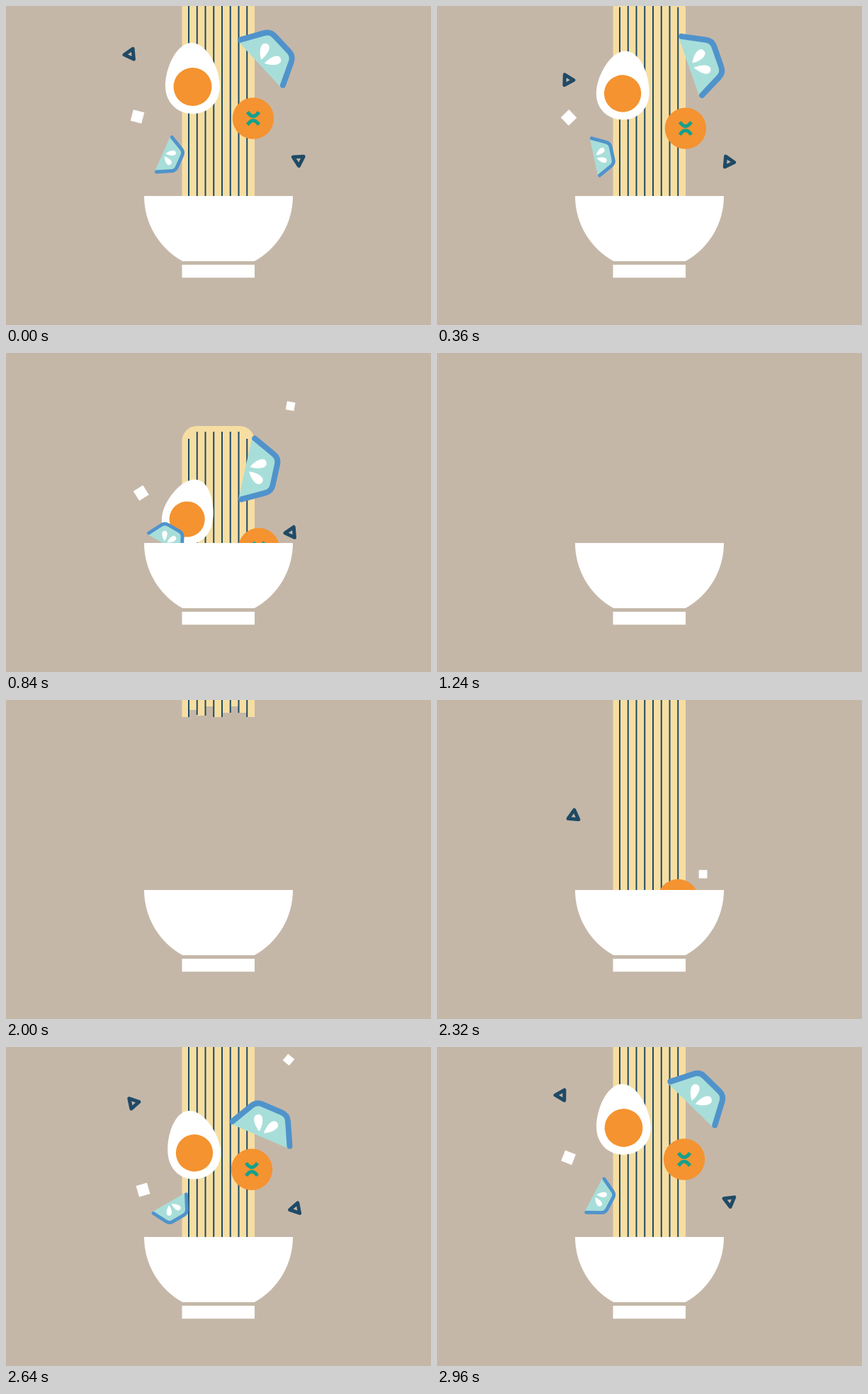
Write an HTML page with a canvas that moves like this. It is 600 px wide and 450 px high and loops after 3000 ms.

```html
<!DOCTYPE html>
<html lang="en">
<head>
<meta charset="utf-8">
<title>Noodle bowl</title>
<style>
  html, body { margin: 0; height: 100%; overflow: hidden; background: #c5b7a8; }
  canvas { display: block; }
</style>
</head>
<body>
<canvas id="stage" width="600" height="450"></canvas>
<script>
const ctx = document.getElementById('stage').getContext('2d');
const LOOP = 3000, STEP = 40, RIM = 268;
const NAVY = '#1f4a66', NOODLE = '#f6dea2', ORANGE = '#f49330', TEAL = '#16a08c';

function fill(color, d) {
  ctx.fillStyle = color;
  ctx.fill(new Path2D(d));
}

function stroke(color, width, d, cap = 'round') {
  ctx.strokeStyle = color;
  ctx.lineWidth = width;
  ctx.lineCap = cap;
  ctx.lineJoin = 'round';
  ctx.stroke(new Path2D(d));
}

function disc(r) {
  ctx.fillStyle = ORANGE;
  ctx.beginPath();
  ctx.arc(0, 0, r, 0, 7);
  ctx.fill();
}

function egg() {
  fill('#fff', 'M0-62C22-62 38.5-25 38.5-1C38.5 23 21 38 0 38S-38.5 23-38.5-1C-38.5-25-22-62 0-62');
  disc(27);
}

function carrot() {
  disc(29.2);
  stroke(TEAL, 5, 'M-8-9Q0 3 8-9M-8 9Q0-3 8 9', 'butt');
}

function cucumber() {
  const rind = 'L35-28Q43-24 43-15V15Q43 24 35 28L';
  fill('#a8ded9', 'M0-44' + rind + '0 44Z');
  stroke('#5093cb', 8, 'M4-44' + rind + '4 44');
  for (const turn of [-0.5, 1]) {
    ctx.rotate(turn);
    fill('#fff', 'M7 0C17-7 31-9 31 0S17 7 7 0');
  }
}

const triangle = () => stroke(NAVY, 5, 'M0-8.5L7.4 4.25H-7.4Z');

const square = side => () => {
  ctx.fillStyle = '#fff';
  ctx.fillRect(-side / 2, -side / 2, side, side);
};

// peak: position at the top of the jump; rise: 360 ms before it; fall: 640 ms after it.
// spin is in degrees per second, shrink is scale lost per second away from the peak.
const items = [
  { draw: egg, peak: [263.5, 114], rise: [266, 149.5], fall: [259, 167.3], power: 3, angle: -2, spin: 21, shrink: 0.085 },
  { draw: cucumber, peak: [358, 82.5], rise: [358.5, 126], fall: [348, 111], power: 3.8, angle: -43, spin: 66 },
  { draw: carrot, peak: [349, 158.5], rise: [347, 172.7], fall: [354, 218], power: 2.5, angle: 0, spin: 0 },
  { draw: cucumber, peak: [221, 208.5], rise: [230, 219], fall: [222.5, 235.5], power: 3, angle: 24, spin: -100, size: 0.61 },
  { draw: triangle, peak: [175.5, 68], rise: [179.5, 79], fall: [199, 221], power: 2.5, angle: 25, spin: -148 },
  { draw: triangle, peak: [413, 217], rise: [409, 228], fall: [407, 233], power: 3, angle: 57, spin: 105 },
  { draw: square(16), peak: [185.5, 156], rise: [193.5, 201.5], fall: [188, 170], power: 4, angle: 15, spin: -163 },
  { draw: square(11.8), peak: [406, -11.6], rise: [399, 18], fall: [404, 16], power: 4.2, angle: 85, spin: 125 }
];

// t is the signed time from the peak, in ms
function drawItem(item, t) {
  const { draw, peak, rise, fall, power, angle, spin, shrink = 0, size = 1 } = item;
  const rising = t < 0;
  const k = rising ? (-t / 360) ** 3.4 : (t / 640) ** power;
  const pose = rising ? rise : fall;
  const x = peak[0] + (pose[0] - peak[0]) * k ** 0.68;
  const y = peak[1] + (pose[1] - peak[1]) * k;
  const scale = size - shrink * Math.abs(t) / 1000;
  ctx.save();
  ctx.translate(x, y);
  ctx.rotate((angle + spin * t / 1000) * Math.PI / 180);
  ctx.scale(scale, scale);
  draw();
  ctx.restore();
}

const LEFT = 248.5, RIGHT = 351;
const lineX = i => 258 + 11.75 * i;
const strandLag = [0, 10, 2, 15, 0, 6, 15, 6, 0];
const lineLag = [0, 3, 2, 0, 0, 6, 6, 0];

function drawNoodles(t) {
  if (t < 0) {
    const head = t + 1024;
    const strand = (color, x, width, lag) => {
      ctx.fillStyle = color;
      ctx.fillRect(x, -10, width, Math.max(0, Math.min(300, head - lag) + 10));
    };
    strandLag.forEach((lag, i) => {
      const from = i ? lineX(i - 1) : LEFT;
      strand(NOODLE, from, (i < 8 ? lineX(i) : RIGHT) - from, lag);
    });
    lineLag.forEach((lag, i) => strand(NAVY, lineX(i) - 1, 2, lag));
  } else {
    const top = -30 + 64 * (t / 640) ** 2.69;
    if (top > RIM) return;
    ctx.fillStyle = NOODLE;
    ctx.beginPath();
    ctx.roundRect(LEFT, top, RIGHT - LEFT, 400, 21);
    ctx.fill();
    ctx.fillStyle = NAVY;
    for (let i = 0; i < 8; i++) {
      ctx.fillRect(lineX(i) - 1, top + (i % 7 ? 8 : 18), 2, 400);
    }
  }
}

function drawBowl() {
  fill('#fff', 'M195 268H405A105 105 0 0 1 350.6 360H249.4A105 105 0 0 1 195 268M248.5 365H351V383.3H248.5Z');
}

function frame(now) {
  const time = Math.floor(now % LOOP / STEP) * STEP;
  const t = time < LOOP / 2 ? time : time - LOOP;
  ctx.fillStyle = '#c5b7a8';
  ctx.fillRect(0, 0, 600, 450);
  if (time < 1240 || time >= 2000) {
    ctx.save();
    ctx.beginPath();
    ctx.rect(0, 0, 600, RIM);
    ctx.clip();
    drawNoodles(t);
    items.forEach(item => drawItem(item, t));
    ctx.restore();
  }
  drawBowl();
  requestAnimationFrame(() => frame(performance.now()));
}
frame(0);
</script>
</body>
</html>
```
